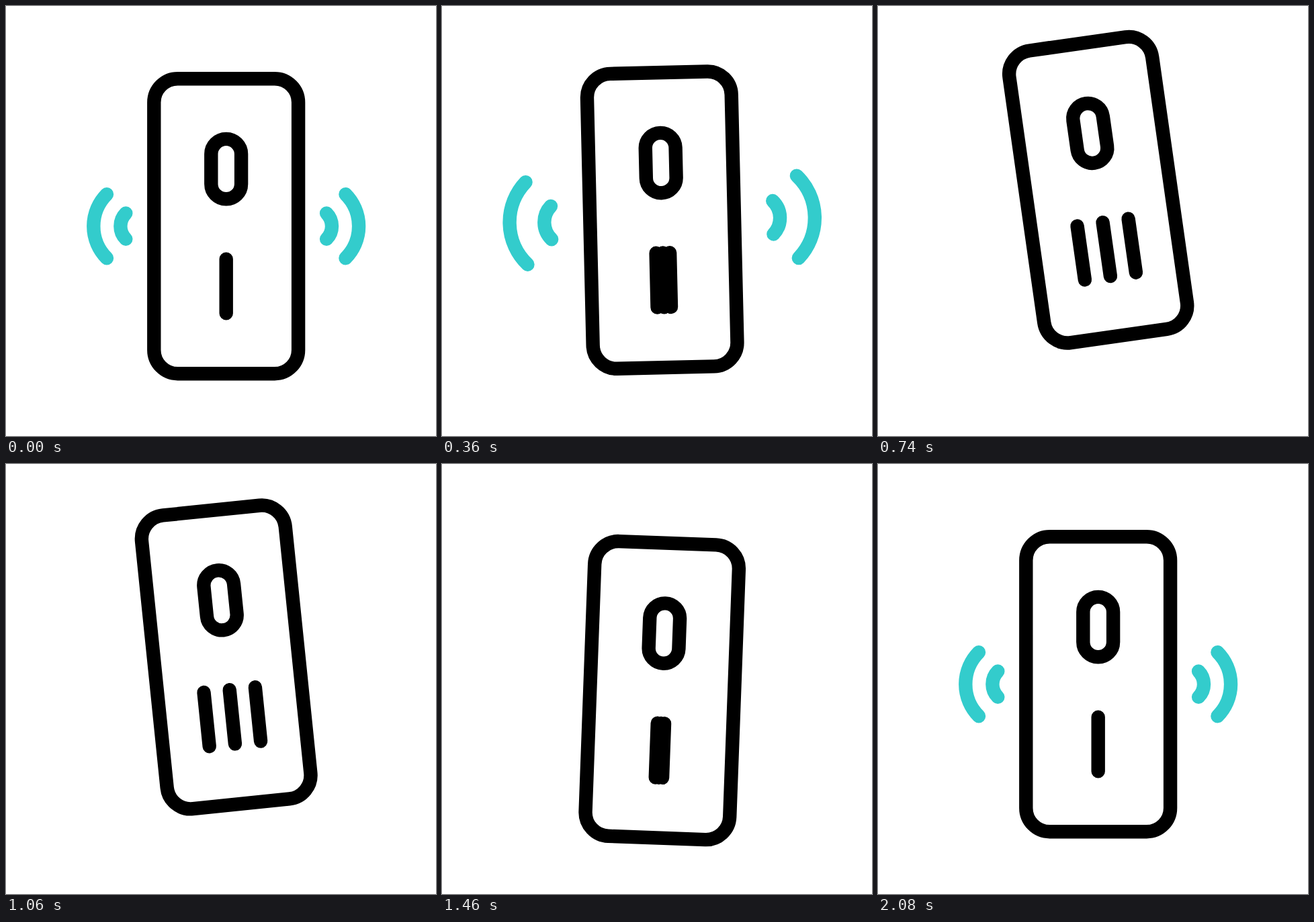
An HTML page for the animation above (2.4 s loop, 640 by 640 pixels).

```html
<!DOCTYPE html>
<html lang="en">
<head>
<meta charset="utf-8">
<title>Vibrating switch</title>
<style>
  html, body { margin: 0; width: 100%; height: 100%; overflow: hidden; background: #fff; }
  svg { display: block; width: 100%; height: 100%; }
  #body { fill: none; stroke: #000; stroke-width: 20.4; stroke-linecap: round; }
  #waves { stroke: #3cc; }
</style>
</head>
<body>
<svg viewBox="0 0 640 640">
  <g id="body">
    <rect x="-107.4" y="-219.5" width="214.8" height="439" rx="35.3"/>
    <rect x="-22.4" y="-129.8" width="44.8" height="89.4" rx="22.4"/>
    <path id="bars"/>
    <path id="waves"/>
  </g>
</svg>
<script>
  const LOOP = 2400, START = 100, TOP = 690, LOW = 1640, END = 2090;
  const [body, bars, waves] = ['body', 'bars', 'waves'].map(id => document.getElementById(id));
  const mix = (a, b, p) => a + (b - a) * p;

  // Progress from time a to b, eased by cubic-bezier(c1, 0, c2, 1)
  function ease(t, a, b, c1 = 1 / 3, c2 = 2 / 3) {
    const x = Math.min(1, Math.max(0, (t - a) / (b - a)));
    let lo = 0, hi = 1;
    for (let i = 0; i < 24; i++) {
      const u = (lo + hi) / 2, v = 1 - u;
      if (3 * c1 * u * v * v + 3 * c2 * u * u * v + u ** 3 < x) lo = u; else hi = u;
    }
    return lo * lo * (3 - 2 * lo);
  }

  // Quarter arc of radius r around (side * dist, 0), bulging outwards
  function arc(side, dist, r) {
    const h = r * Math.SQRT1_2, x = side * (dist + h);
    return `M${x} ${-h}A${r} ${r} 0 0 ${side > 0 ? 1 : 0} ${x} ${h}`;
  }

  function draw(t) {
    const up = ease(t, START, TOP, .75, .7);
    const down = ease(t, TOP, LOW, .6, .59);
    const back = ease(t, LOW, END, .55, .45);
    const pose = (high, low) => mix(mix(high * up, low, down), 0, back);
    body.setAttribute('transform',
      `translate(327.7 ${327.7 + pose(-54.2, 15.5)}) rotate(${pose(-8.1, 3.1)})`);

    const gap = 38.4 * (ease(t, START, TOP, .6, .6) - ease(t, 1050, 1580, .6, .6));
    bars.setAttribute('d', [-gap, 0, gap].map(x => `M${x} 48.9V129.7`).join(''));

    // Waves grow on the way up, vanish, then return small
    const out = ease(t, START, TOP), home = ease(t, LOW, END);
    const late = t >= LOW;
    const scale = late ? mix(.672, 1, home) : mix(1, 1.7, out);
    const dist = late ? mix(138.3, 130.2, home) : mix(130.2, 155, out);
    const shown = late || t < 700;
    waves.setAttribute('d', shown
      ? [-1, 1].map(s => arc(s, dist, 67.2 * scale) + arc(s, dist, 27.1 * scale)).join('')
      : '');
  }

  const begin = performance.now();
  function tick() {
    draw((performance.now() - begin) % LOOP);
    requestAnimationFrame(tick);
  }
  tick();
</script>
</body>
</html>
```
